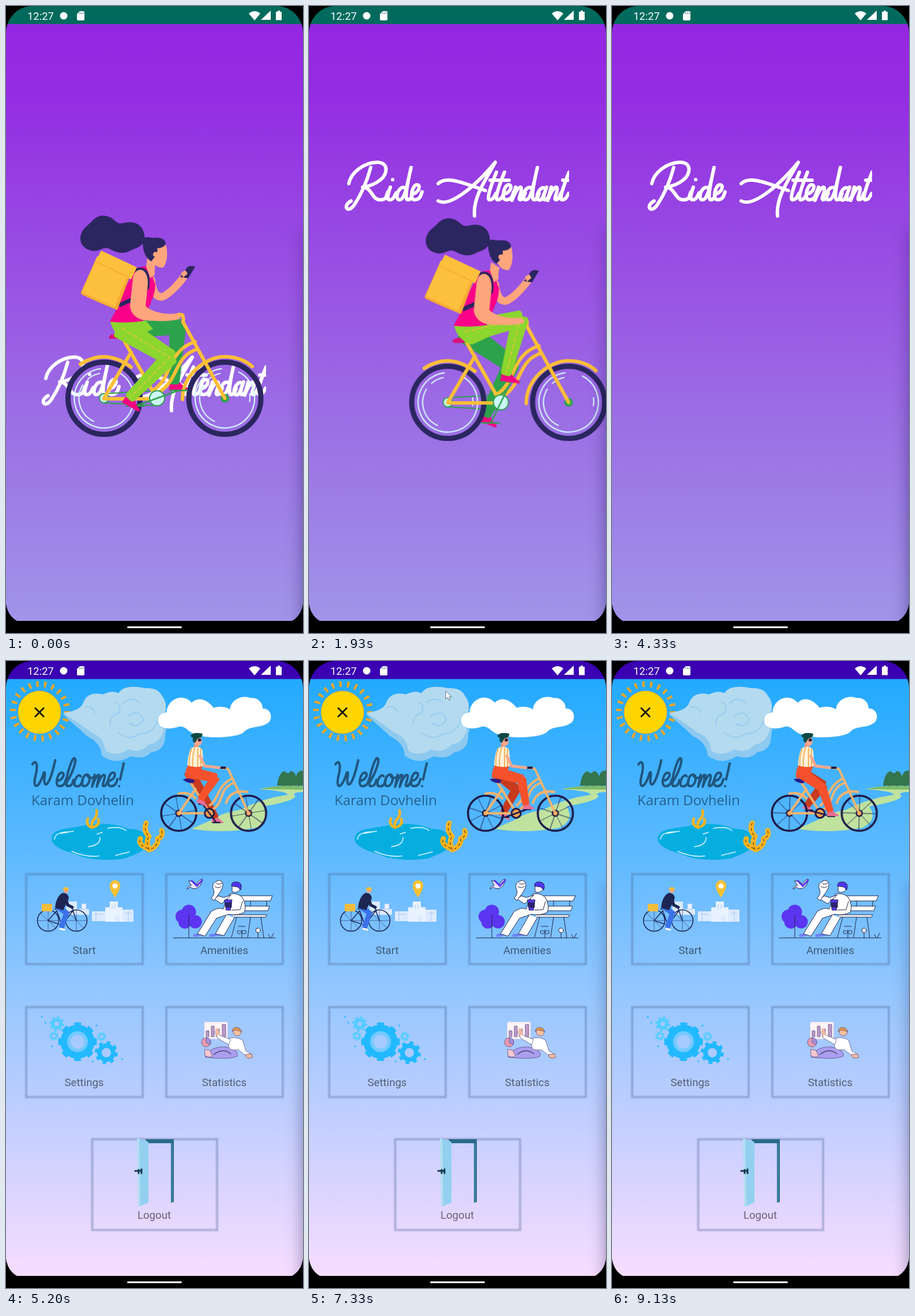
These frames come from a looping animation (515 px wide and 1087 px high, 9.19 s). An HTML page:

```html
<!DOCTYPE html>
<html lang="en">
<head>
<meta charset="utf-8">
<title>Cycling app</title>
<style>
html, body { margin: 0; width: 100%; height: 100%; overflow: hidden; background: #000; }
svg { display: block; width: 100%; height: 100%; }
text { font-family: Roboto, sans-serif; }
.line { fill: none; stroke-linecap: round; stroke-linejoin: round; }
#splash, #home, #zoom, #title, #ride, #cursor { animation: 9190ms linear infinite; }
#splash, #zoom { transform-origin: 257.5px 543.5px; }
#splash { animation-name: zoom-out; }
#home { animation-name: appear; }
#zoom { animation-name: zoom-in; }
#title { animation-name: rise; }
#ride { animation-name: leave; }
#cursor { animation-name: point; }
.spokes { transform-box: fill-box; transform-origin: center; animation: spin 1148.75ms linear infinite; }
@keyframes rise { 0% { transform: translateY(338px); } 11.43%, 100% { transform: none; } }
@keyframes leave { 0%, 19.69% { transform: none; } 27.53%, 100% { transform: translate(419px, 42px); } }
@keyframes zoom-out {
  0%, 47.15% { transform: none; animation-timing-function: cubic-bezier(.05, .7, .1, 1); }
  51.5%, 100% { transform: scale(1.15); }
}
@keyframes zoom-in {
  0%, 47.15% { transform: scale(.85); animation-timing-function: cubic-bezier(.05, .7, .1, 1); }
  51.5%, 100% { transform: none; }
}
@keyframes appear { 0%, 47.5% { opacity: 0; } 48.1%, 100% { opacity: 1; } }
@keyframes point {
  0%, 63% { opacity: 0; transform: translate(14px, 260px); }
  63.01% { opacity: 1; transform: translate(14px, 260px); }
  67% { transform: translate(204px, 70px); }
  72% { transform: translate(214px, 36px); }
  79%, 80% { transform: translate(237px, 52px); }
  87% { transform: translate(70px, 130px); }
  93% { opacity: 1; transform: translate(22px, 340px); }
  93.01%, 100% { opacity: 0; transform: translate(22px, 340px); }
}
@keyframes spin { to { transform: rotate(360deg); } }
</style>
</head>
<body>
<svg viewBox="0 0 515 1087" preserveAspectRatio="none">
<defs>
  <linearGradient id="dusk" x2="0" y2="1">
    <stop stop-color="#9526e2"/><stop offset=".12" stop-color="#942de2"/>
    <stop offset=".5" stop-color="#9a5be4"/><stop offset=".7" stop-color="#9c73e5"/>
    <stop offset="1" stop-color="#a094e9"/>
  </linearGradient>
  <linearGradient id="day" x2="0" y2="1">
    <stop stop-color="#22aaff"/><stop offset=".3" stop-color="#60baff"/>
    <stop offset=".55" stop-color="#9ac8ff"/><stop offset=".7" stop-color="#bacdff"/>
    <stop offset=".85" stop-color="#dad4ff"/><stop offset="1" stop-color="#f6ddff"/>
  </linearGradient>
  <linearGradient id="shade" x2="0" y2="1">
    <stop stop-color="#151030" stop-opacity=".22"/><stop offset=".6" stop-color="#151030" stop-opacity=".4"/>
  </linearGradient>
  <filter id="soft" x="-100%" width="300%"><feGaussianBlur stdDeviation="14"/></filter>
  <filter id="edge"><feGaussianBlur stdDeviation=".8"/></filter>
  <clipPath id="titleClip"><rect y="200" width="451" height="240"/></clipPath>
  <g id="wheel" class="line">
    <circle r="62.5" stroke="#2b265f" stroke-width="9"/>
    <g stroke="#d3f6ff" stroke-width="2.2">
      <circle r="51.5" stroke-dasharray="292 32" transform="rotate(-62)"/>
      <path d="M-18 40A44 44 0 0 1-37-23M-28-33A44 44 0 0 1-8-43M43-8A44 44 0 0 1 43 6"/>
    </g>
  </g>
  <g id="cityWheel" class="line" stroke="#1f1a4a">
    <circle r="30.5" stroke-width="3.6"/>
    <path class="spokes" stroke-width="1" d="M-29 0H29M0-29V29M-20-20L20 20M-20 20L20-20"/>
    <circle r="5" fill="#f0a04f" stroke-width="2.5"/>
  </g>
  <path id="card" d="M1 1H203V157H1Z"/>
</defs>

<g id="splash">
  <rect y="31" width="515" height="1036" fill="url(#dusk)"/>
  <rect y="-90" width="515" height="121.3" fill="#016a5d"/>
  <g id="title"><g id="brand" class="line" role="img" aria-label="Ride Attendant" stroke="#fff" stroke-width="6" clip-path="url(#titleClip)"></g></g>
  <g id="ride">
    <path class="line" stroke="#2ca24c" stroke-width="2" d="M170 672L262 667M170 688L262 693"/>
    <g id="courierFar"></g>
    <path d="M178 574Q181 567 195 568L203 577H180Z" fill="#d9127c"/>
    <use href="#wheel" x="170" y="680"/><use href="#wheel" x="379.5" y="680"/>
    <g class="line" stroke="#fcbf35" stroke-width="6">
      <circle cx="170" cy="680" r="8" fill="#c9f4f0" stroke="#2ca24c" stroke-width="2"/>
      <circle cx="379.5" cy="680" r="7.5" fill="#2ca24c" stroke="none"/>
      <path d="M129 621Q172 593 217 626M306 682C306 640 345 608 379 608Q408 608 427 625"/>
      <path d="M170 681H247M170 680L217 600M203 577L254 667M254 667C290 645 278 598 328 582M268 668C300 645 292 608 331 595"/>
      <path d="M379.5 680L307 548Q309 535 303 535Q296 534 290 541"/>
    </g>
    <circle cx="262" cy="680" r="13" fill="#cbf7f7" stroke="#2ca24c" stroke-width="2"/>
    <path id="crank" class="line" stroke="#2ca24c" stroke-width="2.5"/>
    <path d="M181 546H243L255 560L212 580Q186 572 181 546Z" fill="#8cd62f"/>
    <g id="courierNear"></g>
    <path class="line" stroke="#fda57d" stroke-width="13" d="M252 474Q256 508 272 504Q290 495 311 466"/>
    <path d="M302 470L315 452Q322 449 328 452L316 472Z" fill="#2b265f"/>
    <path d="M304 462l7-4 4 6-8 7z" fill="#fda57d"/>
    <path d="M226 454L253 449Q252 470 259 482Q258 500 252 512L238 546Q205 551 180 547Q196 520 205 492Z" fill="#fa0089"/>
    <path d="M245 437L260 447Q257 452 258 466L250 472L243 452Z" fill="#fda57d"/>
    <g id="head">
      <path d="M250 440Q253 424 262 419L277 414C281 430 279 446 272 454C264 454 257 450 255 444Z" fill="#fda57d"/>
      <path d="M129 398C133 384 142 381 150 372C162 360 178 362 190 374C200 382 207 372 222 376C236 380 240 392 240 404C236 420 222 420 212 426C196 432 186 424 176 420C166 418 160 428 146 424C132 420 127 410 129 398Z" fill="#2b265f"/>
      <path d="M236 405C243 397 250 404 258 402C269 401 278 406 276 414Q272 420 262 420Q264 430 251 443C240 435 237 424 236 405Z" fill="#2b265f"/>
      <circle cx="259" cy="431" r="4.5" fill="#fda57d"/>
    </g>
    <path class="line" stroke="#2b265f" stroke-width="7" d="M227 458Q249 452 245 488M198 518L216 510"/>
    <path d="M158 434L217 462L193 527Q160 514 131 500Q129 497 131 494Z" fill="#f7a934"/>
    <path d="M158 434L214 460L188 522L132 496Z" fill="#fcc03c"/>
    <path d="M165 424L227 453L217 474L154 445Z" fill="#fcc03c"/>
    <path class="line" stroke="#f7a934" stroke-width="1.5" d="M155 443L212 470"/>
    <path d="M220 472C224 450 247 452 246 482L242 520C252 530 275 536 296 533Q307 538 300 543Q285 548 240 545Q217 540 215 520Z" fill="#fda57d"/>
  </g>
</g>

<g id="home"><g id="zoom">
  <rect y="31" width="515" height="1036" fill="url(#day)"/>
  <rect width="515" height="31.3" fill="#3a00b2"/>

  <circle cx="59" cy="87" r="47" fill="none" stroke="#f2a51f" stroke-width="10" stroke-dasharray="4 9.42"/>
  <circle cx="58" cy="89" r="37" fill="#ffd500" stroke="#f0aa20"/>
  <path d="M50 81l16 16m0-16l-16 16" stroke="#111" stroke-width="2.8"/>

  <path d="M99 92Q130 86 134 74Q142 52 168 58Q185 50 195 56Q205 40 240 47Q264 46 270 60Q280 72 276 90Q281 112 276 128Q277 155 252 158Q240 172 216 165Q190 182 166 164Q165 142 140 130Q128 118 111 104Z" fill="#8ec9ef"/>
  <path d="M99 90Q130 86 134 72Q142 52 168 58Q185 50 195 56Q205 40 240 47Q264 46 270 60Q280 72 276 88Q270 98 274 115Q270 142 247 145Q232 162 212 153Q190 168 172 155Q170 132 148 124Q130 110 111 98Z" fill="#b4daef"/>
  <path class="line" stroke="#9acdef" stroke-width="2.2" d="M136 80Q150 77 154 90M190 72Q201 75 196 90Q178 95 181 111M204 73Q216 60 232 72M211 96Q231 82 238 102Q230 118 214 108M195 124Q213 140 232 126Q255 127 262 105"/>
  <path d="M266 112C258 98 268 88 278 89C280 66 306 54 322 72C335 60 350 68 360 81C372 77 384 80 388 84C390 66 410 58 424 64C438 62 446 75 445 82C462 82 464 104 452 109C440 117 422 112 412 124C400 134 345 135 330 128C315 124 312 112 300 114C285 119 272 118 266 112Z" fill="#fff" stroke="#5bb5ef" stroke-width=".7"/>

  <g id="welcome" class="line" role="img" aria-label="Welcome!" stroke="#20567f" stroke-width="4.6"></g>
  <text x="44" y="250" font-size="24" fill="#24608f" style="font-family:'Open Sans',sans-serif">Karam Dovhelin</text>

  <path d="M515 222Q470 214 439 222Q490 226 488 232Q445 238 406 258Q375 263 360 274L322 291Q375 300 434 289Q462 275 446 252Q500 243 502 234Q493 228 515 227Z" fill="#bfe29e"/>
  <path d="M515 217Q475 214 440 222L515 223Z" fill="#7dbb67"/>
  <path d="M481 200v17m12-17v17m15-17v17" stroke="#6c4a3a" stroke-width="2"/>
  <path d="M470 216Q473 193 483 191Q490 198 493 191Q500 190 503 200Q506 189 515 190V216Z" fill="#35754d"/>

  <path d="M79 308C81 286 120 292 143 283C170 282 190 281 212 291C232 290 248 300 242 313C250 326 225 335 207 342C180 347 138 345 122 335C100 329 80 322 79 308Z" fill="#06aee0"/>
  <path class="line" stroke="#d8f3ff" stroke-width="1.6" d="M84 309Q85 296 111 296M95 299l22-4M143 322Q164 319 163 306M176 290Q200 286 208 294M114 330Q140 341 161 338M190 337L214 331M158 300l9-3"/>
  <g class="line" stroke="#fbb51e">
    <path stroke-width="4.5" d="M150 289Q147 281 152 275Q159 269 157 259M147 288Q138 283 142 273M154 287Q163 283 160 274"/>
    <path stroke-width="9" d="M248 327Q242 313 248 304Q238 294 243 281M246 325Q228 318 233 308M252 326Q265 318 263 308Q273 305 270 294"/>
    <path stroke="#69471a" stroke-width="1.3" stroke-dasharray="4 5" d="M248 327Q242 313 248 304Q238 294 243 281M246 325Q228 318 233 308M252 326Q265 318 263 308Q273 305 270 294"/>
  </g>

  <g id="cityBike">
    <g id="cityFar"></g>
    <use href="#cityWheel" x="308" y="264"/><use href="#cityWheel" x="429" y="264"/>
    <g class="line" stroke="#f5b36c" stroke-width="4">
      <path d="M308 264L361 264M308 264L337 222M327 208L360 261M360 261C390 248 374 224 402 212M362 250C377 240 374 218 398 205M429 264L395 190Q392 184 384 186M390 246Q398 222 427 227M308 230Q325 226 337 238"/>
      <path d="M377 185h11" stroke="#22194a"/>
    </g>
    <path d="M315 205Q326 202 336 207L332 212Q320 211 315 205Z" fill="#2a1a8c"/>
    <circle cx="361" cy="264" r="8" fill="#f0a04f" stroke="#1f1a4a" stroke-width="3"/>
    <path id="cityCrank" class="line" stroke="#1f1a4a" stroke-width="2.5"/>
    <g id="cityNear"></g>
    <path d="M324 180H350L344 196L320 204Q317 194 324 180Z" fill="#f4512c"/>
    <path d="M335 139l7 3v9l-8 1z" fill="#ee9a80"/>
    <ellipse cx="342" cy="139" rx="6" ry="8" fill="#f9a88d"/>
    <path d="M328 130Q333 122 349 126Q350 133 341 134L336 142Q330 138 333 134Z" fill="#0d4845"/>
    <circle cx="344" cy="137" r="2.8" fill="#241a33"/>
    <path d="M329 151Q345 145 349 155L351 182Q337 186 323 181Q323 165 329 151Z" fill="#fff3da"/>
    <path class="line" stroke="#f3ae55" stroke-width="2" d="M330 152Q325 165 326 181M336 150Q331 165 332 182M341 151V183M346 152V182"/>
    <path class="line" stroke="#f9a88d" stroke-width="5" d="M345 165L353 182L378 185"/>
  </g>

  <g fill="none" stroke="#4d6590" stroke-width="3.6" opacity=".4" filter="url(#edge)">
    <use href="#card" x="34" y="368.5"/><use href="#card" x="277" y="368.5"/>
    <use href="#card" x="34" y="599"/><use href="#card" x="277" y="599"/>
    <path d="M149.5 829H366V986.5H149.5Z"/>
  </g>
  <g font-size="18.6" text-anchor="middle" fill-opacity=".54">
    <text x="135.5" y="508">Start</text><text x="378.5" y="508">Amenities</text>
    <text x="135.5" y="737">Settings</text><text x="378.5" y="737">Statistics</text>
    <text x="257" y="966.5">Logout</text>
  </g>

  <g>
    <path d="M105 417h18v13h21v10h-39zM149 434h23v17h-23zM178 432h25v20h-25zM202 431h19v21h-19z" fill="#dceaff"/>
    <path d="M172 452v-25h8v-10h14v10h8v25h-5v-10h-8v10z" fill="#e9f2ff"/>
    <path d="M131 430v-9h8v9zM153 439h15m38-2h11M156 432v18M184 422v8m5-8v8M212 434v17" stroke="#a9c8f4" fill="#eef4ff"/>
    <path d="M189 410Q179 396 180 389A9 9 0 0 1 198 389Q198 397 189 410Z" fill="#fcc12f"/><circle cx="189" cy="390" r="4.5" fill="#fff"/>
    <g class="line" stroke="#1d2a5c">
      <path stroke-width="1.6" d="M54.500 450a18.500 18.500 0 1 0 37 0a18.500 18.500 0 1 0-37 0M103.500 450a18.500 18.500 0 1 0 37 0a18.500 18.500 0 1 0-37 0M73 450l15-17 9 25 19-25 6 17M73 450l24 8M84 430h10M111 424l6 9"/>
      <path stroke-width=".6" d="M73 432v36M55 450h36M122 432v36M104 450h36M60 437l26 26M109 437l26 26"/>
    </g>
    <rect x="62" y="421" width="18" height="13" rx="1" fill="#f3bd3c"/>
    <path class="line" stroke="#3c72e8" stroke-width="9" d="M92 428L105 437L97 460"/>
    <path class="line" stroke="#fff" stroke-width="3" d="M94 464l7 2"/>
    <path d="M85 428Q87 408 98 402Q108 402 109 411L105 420L99 432Z" fill="#1d2553"/>
    <path class="line" stroke="#1d2553" stroke-width="5" d="M103 409l4 14 8 4"/>
    <circle cx="104" cy="398" r="4" fill="#f4a27c"/><path d="M98 397Q101 389 109 394L108 397Z" fill="#f3bd3c"/>
  </g>

  <g class="line" stroke="#23264b">
    <path stroke="#5b35f0" stroke-width="5" d="M327 476l18-4m10 4l20-3" opacity=".45"/>
    <g fill="#5b35f0" stroke="none"><circle cx="317" cy="435" r="12.5"/><circle cx="306" cy="443" r="12"/><circle cx="328" cy="452" r="11.5"/><circle cx="310" cy="453" r="11"/></g>
    <path d="M290 480H467M317 440V480M397 407L462 407L458 416H400M409 425H457L454 433H410M393 440H452L450 444H394" fill="#fff"/>
    <path d="M424 416v9m28-9v9M400 444l-9 35m51-35l5 36M424 444l-5 35M409 480v-14m28 14v-9M458 480l-3-6m5 6l4-8"/>
    <path d="M402 472q-4-7 7-3q9-5 7 3q-5 3-7-2q-4 5-7 2M403 460h12"/><circle cx="437" cy="467" r="4" fill="#fff"/>
    <path d="M388 404Q401 401 410 410Q418 425 413 436Q400 442 386 439L365 446L345 477L332 473L356 434Q369 426 376 430Z" fill="#fff"/>
    <path d="M382 440L363 473L378 476L396 445" fill="#fff"/>
    <path d="M390 406L374 421L361 413L368 407L377 410Z" fill="#fff"/><path d="M356 411Q363 403 360 397Q354 384 370 380Q382 384 371 401L361 415Z" fill="#fff"/>
    <path d="M364 385q5 4 10 0m-12 6q6 4 11 0"/>
    <path d="M392 388V400Q402 404 407 394V387Z" fill="#fff"/><path d="M391 390Q390 382 401 383Q411 385 407 397L402 392Z" fill="#4e36f0"/>
    <path d="M379 414h13l-3 18h-7z" fill="#5b35f0"/><path d="M380 419h11v8h-10z" fill="#2c246e"/><path d="M410 417l-4 14-15 1"/>
    <path d="M317 381q9 0 13 6q8-12 11-8l-4 10q-9 10-18 3l-5 4q1-6 7-7z" fill="#e8e5ff"/><path d="M322 381l9 9 9-10" stroke="#5b35f0" stroke-width="3"/>
  </g>

  <g fill="none" stroke="#22b9ff">
    <circle cx="124" cy="660" r="23.5" stroke-width="12"/><circle cx="124" cy="660" r="30" stroke-width="7" stroke-dasharray="11.56 12" transform="rotate(-11 124 660)"/>
    <circle cx="124" cy="660" r="15" stroke="#74c9ff" stroke-width="6"/>
    <circle cx="174" cy="679" r="12" stroke-width="8"/><circle cx="174" cy="679" r="17.5" stroke-width="5" stroke-dasharray="6.5 7.24"/>
    <g stroke="#55ccff"><circle cx="88" cy="629" r="7" stroke-width="6"/><circle cx="88" cy="629" r="11" stroke-width="4" stroke-dasharray="4.3 4.34"/>
    <circle cx="83" cy="650" r="4.5" stroke-width="3"/><circle cx="83" cy="650" r="7" stroke-width="2.5" stroke-dasharray="2.7 2.8"/>
    <circle cx="166" cy="651" r="4.5" stroke-width="3"/><circle cx="166" cy="651" r="7" stroke-width="2.5" stroke-dasharray="2.7 2.8"/></g>
    <path class="line" stroke-width="3" d="M62 617h.1M68 627h.1M157 632h.1M80 668h.1M150 694h.1M201 690h.1"/>
  </g>

  <g class="line" stroke="#514377" stroke-width=".7">
    <rect x="344" y="626" width="40" height="29" rx="2" fill="#fff4f6" stroke="#f0dbe8"/>
    <path d="M347 651v-10h5v10zM356 651v-18h5v18zM365 651v-13h5v13zM375 651v-21h6v21z" fill="#bc9aca"/>
    <circle cx="347" cy="661" r="8" fill="#e89aaf"/><path d="M347 661v-8a8 8 0 0 1 7 12z" fill="#a790dc"/>
    <path d="M346 684Q357 667 381 669Q404 674 401 685Q390 691 357 688L346 687Z" fill="#aa9fee"/>
    <path d="M361 682Q376 670 390 681" stroke-width="1.5"/><path d="M345 673l9 2 4 10q-6 4-13-1z" fill="#f5c7d0"/>
    <path d="M384 655Q398 650 410 657L416 676L426 682L417 685L403 674Q385 676 386 667Z" fill="#fff"/>
    <path d="M389 656L371 649L366 639L362 643L367 654L386 665Z" fill="#fff"/><path d="M363 637l5 0 3 11-6 2z" fill="#f3b99e" stroke="none"/>
    <circle cx="401" cy="643" r="7" fill="#f6c1a0"/><path d="M392 642Q394 632 405 637L409 642L397 640Z" fill="#e59a45"/><path d="M416 682l10-1 2 6q-8 4-12-1z" fill="#f3b99e"/>
  </g>

  <path d="M241 829H291V938L286 939V836H247Z" fill="#28698a"/><path d="M288 836V938" stroke="#4c94b2" stroke-width="1.5"/>
  <path d="M227 827L247 834V939L230 946Z" fill="#93d0ef"/><path d="M227 827L231 829L233 944L229 945Z" fill="#b5def1"/>
  <path class="line" stroke="#163a52" stroke-width="3" d="M224 884h10M230 882v6M235 881v7"/>

  <path id="cursor" d="M0 0V14L3.5 11L6 16L8 15L6 10H10Z" fill="#fff" stroke="#3c586d" stroke-width=".8"/>
</g></g>

<rect x="515" y="385" width="60" height="720" fill="url(#shade)" filter="url(#soft)"/>
<g fill="#fff">
  <text x="37" y="24" font-size="18.4">12:27</text>
  <circle cx="100" cy="17" r="6.5"/>
  <path d="M128 9H134Q136 9 136 11V23Q136 25 134 25H125Q123 25 123 23V14Z"/>
  <path d="M421 13Q431 5 441 13L431 25ZM459 8V24H442ZM468 10h3V8h4v2h3v14.500h-10Z"/>
</g>
<path d="M128 11v3m3-3v3m3-3v3" stroke="#315d75"/>
<path d="M0 0H46A46 47 0 0 0 0 47ZM515 0H469A46 47 0 0 1 515 47ZM0 1036Q3 1057 19 1066H496Q512 1057 515 1036V1087H0Z"/>
<rect x="210" y="1075.5" width="95" height="3" rx="1.5" fill="#fff"/>
</svg>

<script>
const LOOP = 9190;
const byId = id => document.getElementById(id);

// Pen strokes on a zero baseline, each with its advance.
const glyphs = {
  R: [70, 'M4-28C8-48 30-64 52-65C74-66 72-44 58-34C48-26 36-23 28-22C44-22 44 0 58 0S68-8 72-14M42-56C36-34 26-10 14 8C2 26-8 10 8 2'],
  A: [84, 'M2 2C20 12 60-16 101-65C84-34 62-4 65 28M2-28C16-42 44-30 84-16'],
  W: [46, 'M2-42C8-52 14-44 8-20C2 4 12 8 22-20C24-30 28-30 25-14C24 4 34 4 46-50'],
  i: [16, 'M6-22C2-10-1 0 5 0S13-6 16-12M10-35l.1 0'],
  d: [24, 'M17-20C6-28-4-2 5 0S18-20 26-56C20-30 14 0 20 0S27-6 29-11'],
  e: [17, 'M3-10C16-12 20-26 12-26S-2 0 8 0S19-8 21-14'],
  t: [14, 'M19-48C10-26 1 0 7 0S15-5 18-11M8-34H27'],
  n: [19, 'M7-22L1 1C6-14 14-25 17-21S10 0 15 0S22-6 24-12'],
  a: [19, 'M16-19C8-28-4-3 4 0S14-14 18-22C14-10 10 0 15 0S22-6 24-12'],
  l: [16, 'M4-6C16-24 26-52 20-54S-2 0 7 0S16-6 18-12'],
  c: [18, 'M16-19C10-28-2-2 7 0S18-6 20-12'],
  o: [19, 'M12-22C2-26-4 0 5 0S20-20 11-22C12-16 18-14 22-17'],
  m: [29, 'M6-22L1 1C6-14 12-25 15-21L10 1C15-14 22-25 25-21S18 0 23 0S30-6 32-12'],
  '!': [16, 'M16-44L9-13M7 0l.1 0'],
  ' ': [30, '']
};

function letter(id, word, x, y, scale) {
  let pen = 0;
  byId(id).innerHTML = [...word].map(char => {
    const [advance, d] = glyphs[char];
    const path = `<path d="${d}" transform="translate(${x + pen * scale} ${y}) scale(${scale})"/>`;
    pen += advance;
    return path;
  }).join('');
}
letter('brand', 'Ride Attendant', 65, 336, 1);
letter('welcome', 'Welcome!', 44, 217, .9);

const courier = {
  name: 'courier', crankId: 'crank', hip: [200, 558], crank: [262, 680], radius: 40,
  thigh: 98, shin: 96, widths: [14, 9, 4], ankle: [-8, -16], shoeScale: 1, round: 11,
  near: '#8cd62f', far: '#2ca24c', shoe: '#f2077f', seam: '#fcc03c', pad: 15
};
const city = {
  name: 'city', crankId: 'cityCrank', hip: [327, 193], crank: [361, 264], radius: 20,
  thigh: 45, shin: 43, widths: [7, 5, 3], ankle: [-2, -10], shoeScale: .6, round: 6,
  near: '#f4512c', far: '#c73a1e', shoe: '#e96f94', seam: 'none', pad: 6
};

for (const rider of [courier, city]) {
  for (const side of ['Far', 'Near']) {
    const color = rider[side.toLowerCase()];
    byId(rider.name + side).innerHTML =
      `<path fill="${rider.shoe}" d="M-7-3L6-3Q13 8 25 12V16H-9Z"/>` +
      `<path fill="${color}" stroke="${color}" stroke-width="${rider.round}" stroke-linejoin="round"/>` +
      `<path class="line" stroke="${side === 'Near' ? rider.seam : 'none'}" stroke-width="1.4" stroke-dasharray="7 5"/>`;
  }
}

function taper([ax, ay], [bx, by], wa, wb) {
  const length = Math.hypot(bx - ax, by - ay);
  const nx = (ay - by) / length, ny = (bx - ax) / length;
  return `M${ax + nx * wa} ${ay + ny * wa}L${bx + nx * wb} ${by + ny * wb}` +
    `L${bx - nx * wb} ${by - ny * wb}L${ax - nx * wa} ${ay - ny * wa}Z`;
}

function poseLeg(rider, side, degrees) {
  const angle = degrees * Math.PI / 180;
  const { hip, thigh, shin, widths } = rider;
  const pedal = [
    rider.crank[0] + rider.radius * Math.cos(angle),
    rider.crank[1] + rider.radius * Math.sin(angle)
  ];
  const ankle = [pedal[0] + rider.ankle[0], pedal[1] + rider.ankle[1]];
  const dx = ankle[0] - hip[0], dy = ankle[1] - hip[1];
  const reach = Math.hypot(dx, dy);
  const along = (reach * reach + thigh * thigh - shin * shin) / (2 * reach);
  const bend = Math.sqrt(Math.max(0, thigh * thigh - along * along));
  const knee = [
    hip[0] + (dx * along + dy * bend) / reach,
    hip[1] + (dy * along - dx * bend) / reach
  ];
  const [shoe, pants, seam] = byId(rider.name + side).children;
  const tilt = 15 - 15 * Math.cos(angle);
  shoe.setAttribute('transform', `translate(${ankle}) rotate(${tilt}) scale(${rider.shoeScale})`);
  pants.setAttribute('d', taper(hip, knee, widths[0], widths[1]) + taper(knee, ankle, widths[1], widths[2]));
  seam.setAttribute('d', `M${hip}L${knee}L${ankle}`);
  return pedal;
}

function pose(rider, degrees) {
  const near = poseLeg(rider, 'Near', degrees);
  const far = poseLeg(rider, 'Far', degrees + 180);
  const pad = ([x, y]) => `M${x - rider.pad} ${y}h${rider.pad * 2}`;
  byId(rider.crankId).setAttribute('d', `M${near}L${far}` + pad(near) + pad(far));
}

const wave = degrees => Math.cos(degrees * Math.PI / 180);
const shift = (id, x, y) => byId(id).setAttribute('transform', `translate(${x} ${y})`);

function draw() {
  const t = performance.now() % LOOP;
  const pedalling = t < 730 ? 160 + t * .24 : 335 + (t - 730) * .2675;
  pose(courier, pedalling);
  const nod = 1 - wave(pedalling - 120);
  shift('head', 1.6 * nod, -1.5 * nod);

  const turn = 233 + (t - 5200) * .2193;
  pose(city, turn);
  shift('cityBike', 4.3 * wave(turn - 35) - 4.3, 0);
  requestAnimationFrame(draw);
}
draw();
</script>
</body>
</html>
```
